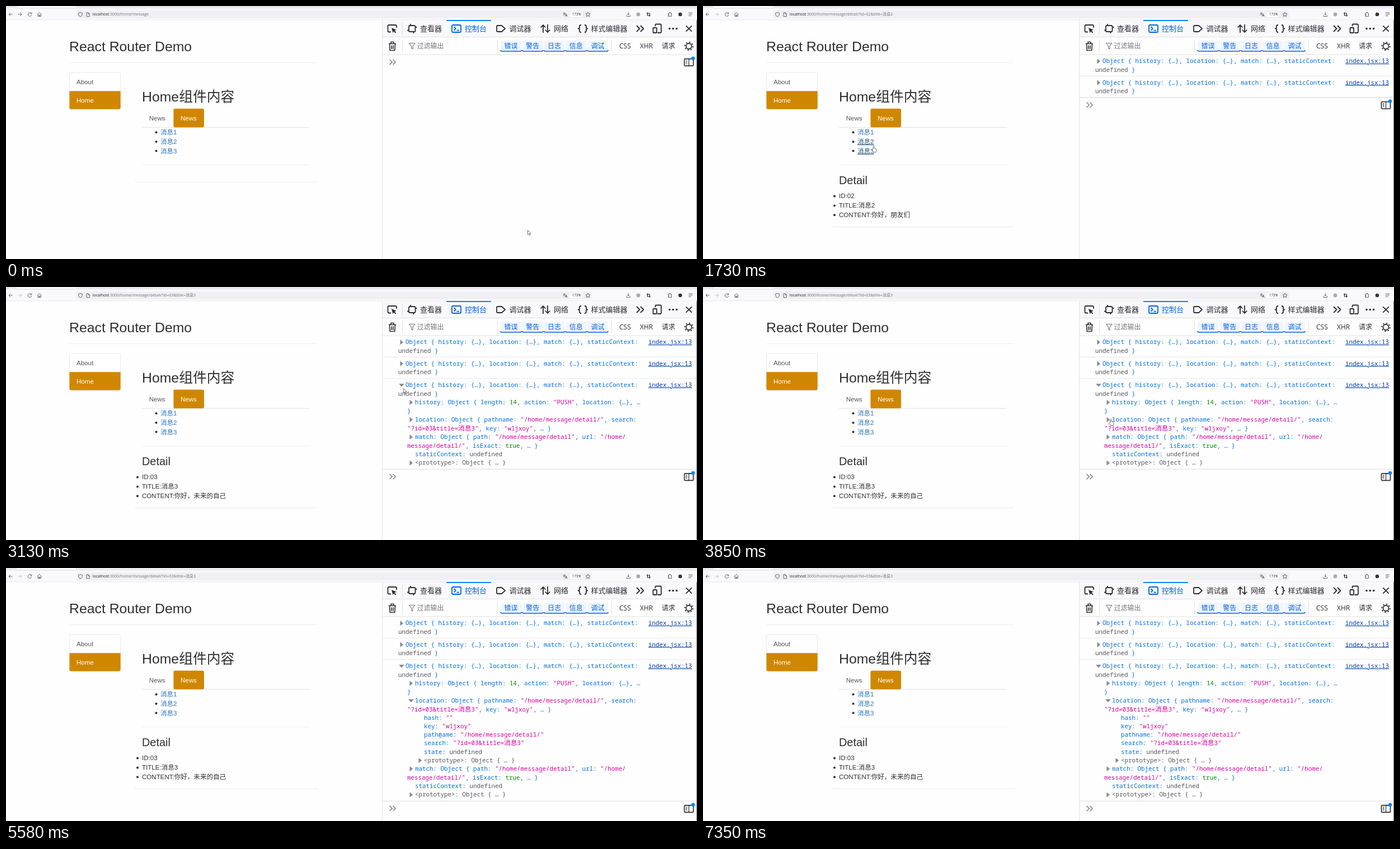
An HTML page for the animation above (7440 ms loop, 1235 px wide and 453 px high).

```html
<!DOCTYPE html>
<html lang="zh">
<head>
<meta charset="utf-8">
<title>React Router Demo</title>
<style>
html, body { margin: 0; width: 100%; height: 100%; overflow: hidden; background: #fefefe; }
svg { display: block; width: 100vw; height: 100vh; }
text { white-space: pre; }
.page { font: 11.55px "Liberation Sans", "Noto Sans CJK SC", sans-serif; fill: #2e2e2e; }
.url { font: 7.02px "Open Sans", "Noto Sans CJK SC", sans-serif; fill: #707078; }
.ui { font: 12px "Open Sans", "Noto Sans CJK SC", sans-serif; fill: #2b2b33; }
.tab { font-size: 13px; font-weight: 500; }
.mono { font: 500 10.83px "Noto Sans Mono", "Noto Sans CJK SC", monospace; fill: #006fe0; }
.mono .str { fill: #d8009f; }
.mono .num { fill: #058b00; }
.mono .dim, .mono.dim { fill: #55555e; }
.mono .cjk { font-size: 11.8px; font-weight: 400; }
.mono.sel, .mono.sel tspan { fill: #fff; }
.line { fill: none; stroke: #2b2b33; stroke-width: 1.8; stroke-linejoin: round; }
.thin { fill: none; stroke: #55555c; stroke-width: .9; }
.link { fill: #2c74b6; }
.link.on { fill: #23527c; text-decoration: underline; }
</style>
</head>
<body>
<svg viewBox="0 0 1235 453" preserveAspectRatio="none">
  <rect width="1235" height="453" fill="#fefefe"/>

  <!-- browser bar -->
  <rect width="1235" height="5" fill="#ebebef"/>
  <rect x="18" width="108" height="3.5" fill="#fff" stroke="#d4d4d8" stroke-width=".7"/>
  <rect y="4.5" width="1235" height="20" fill="#f9f9fb"/>
  <path d="M0 24.8H1235" stroke="#e4e4e8" stroke-width=".8"/>
  <rect x="126" y="8" width="921" height="14" rx="2" fill="#f0f0f4"/>
  <g class="thin">
    <path d="M11.5 15H5m3-3-3 3 3 3"/>
    <path id="fwd" d="M21.5 15H28m-3-3 3 3-3 3"/>
    <path d="M45.5 13.5A3.3 3.3 0 1 0 45.8 16M45.8 11.5v2.3h-2.3"/>
    <path d="M56 15l3.7-3.5L63.4 15M57 14.5V18.5h5.4v-4M59 18.5v-2.5h1.5v2.5"/>
    <path d="M133 11.5l3.3 1v3q-.5 2.5-3.3 3.5-2.8-1-3.3-3.5v-3z"/>
    <path d="M144 11.8h3l2.3 2.3v4.7H144zM147 11.8v2.3h2.3"/>
    <path d="M995.5 12.8h4.5M997.7 11.8v1M996 16.5l3.3-3.5M996.7 14l2.5 2.5M999.3 18.8l1.9-4.8 1.9 4.8M1000 17.2h2.5"/>
    <path d="M1040 11l1.2 2.7 2.9.3-2.2 1.9.7 2.9-2.6-1.5-2.6 1.5.7-2.9-2.2-1.9 2.9-.3z"/>
    <path d="M1112.3 11v5m-2-2 2 2 2-2M1109 16.5v2h6.6v-2"/>
    <path d="M1146.5 11.5v5.5h5.5M1144.8 13h5.5v5.8" stroke="#222" stroke-width="1.2"/>
    <path d="M1183.5 13h2v-1.5h2V13h2v5.5h-6v-2h1.5v-1.5h-1.5z"/>
    <path d="M1220 12h6.5M1220 14.7h6.5M1220 17.4h4.5"/>
  </g>
  <rect x="1008" y="10.5" width="22" height="9" rx="2" fill="#fff"/>
  <text class="url" x="1012" y="17.3" style="font-size:6.2px;fill:#222">173%</text>
  <circle cx="1130" cy="15" r="3.4" fill="#aaa"/>
  <circle cx="1205" cy="15" r="3.3" fill="#333"/>
  <circle id="badge" cx="1226" cy="12.5" r="1.3" fill="#e8b030"/>
  <text class="url" x="154.7" y="17.3"><tspan fill="#222">localhost</tspan><tspan id="path"></tspan></text>

  <!-- web page -->
  <g class="page">
    <text x="113" y="80.7" font-size="24.8">React Router Demo</text>
    <path d="M113 101.5H556M243 284.5H543" stroke="#efefef"/>
    <rect x="113.5" y="119" width="91" height="66" rx="3" fill="#fff" stroke="#e2e2e2" stroke-width=".8"/>
    <path d="M113.4 152.3H204.7V182q0 2.8-2.8 2.8H116.2q-2.8 0-2.8-2.8z" fill="#d08700"/>
    <text x="126" y="139.7" fill="#555">About</text>
    <text x="126" y="172.8" fill="#fff">Home</text>
    <path id="panel" fill="none" stroke="#ececec"/>
    <text x="243" y="170.5" font-size="24.8">Home组件内容</text>
    <path d="M243 217.3H543" stroke="#e0e0e0"/>
    <text x="255.7" y="204.5" fill="#555">News</text>
    <rect x="299.4" y="183.8" width="54.6" height="33.4" rx="2.8" fill="#d08700"/>
    <text x="312" y="204.5" fill="#fff">News</text>
    <g id="links"></g>
    <g id="detail">
      <text x="243" y="318.8" font-size="19.9">Detail</text>
      <circle cx="235" cy="340.5" r="2"/><circle cx="235" cy="357.5" r="2"/><circle cx="235" cy="374.3" r="2"/>
      <text x="243" y="344.3" id="d0"></text>
      <text x="243" y="361.2" id="d1"></text>
      <text x="243" y="378" id="d2"></text>
    </g>
  </g>

  <!-- developer tools -->
  <rect x="673" y="25.2" width="562" height="30" fill="#f9f9fb"/>
  <path d="M672.7 25V453M673 55.5H1235M673 87H1235M708.5 29V51M708.5 61V82M878.5 61V82M1082.5 61V82" stroke="#e0e0e2"/>
  <rect x="787" y="25" width="80" height="2" fill="#0a84ff"/>
  <g class="line">
    <path d="M688 46.5H684.5q-2 0-2-2V36q0-2 2-2H696q2 0 2 2V39"/>
    <path d="M689 39l9 3.8-3.7 1.3 3 3-1.3 1.3-3-3-1.3 3z" fill="#2b2b33" stroke="none"/>
    <rect x="720" y="35" width="11.5" height="11" rx="2"/>
    <path d="M723 35V32M728.5 46v3M720 43.5h-3M731.5 38h3"/>
    <g stroke="#0061e0"><rect x="797" y="34" width="16" height="13" rx="2"/><path d="M800.5 37l3.3 3.3-3.3 3.3M805.5 43.7h4.5"/></g>
    <path d="M879 35h7l6 5.5-6 5.5h-7q-2 0-2-2v-7q0-2 2-2z"/>
    <path d="M960 48V34m-4.3 4.5L960 34l4.3 4.5M968 33V47m-4.3-4.5L968 47l4.3-4.5"/>
    <path d="M1028 34q-3 0-3 2.5v2q0 2-2.3 2 2.3 0 2.3 2v2q0 2.5 3 2.5M1034 34q3 0 3 2.5v2q0 2 2.3 2-2.3 0-2.3 2v2q0 2.5-3 2.5"/>
    <path d="M1127 35l5.5 5.5-5.5 5.5M1134 35l5.5 5.5-5.5 5.5"/>
    <path d="M1160.5 36.5V34q0-1.5 1.5-1.5h7.5q1.5 0 1.5 1.5V46.5q0 1.5-1.5 1.5H1164.5"/>
    <rect x="1156.5" y="39" width="6.5" height="9" rx="1"/>
    <path d="M1215.3 35.3l10.4 10.4M1225.7 35.3l-10.4 10.4"/>
    <path d="M684 67.5h13M688 67v-2.5h5V67M685.5 68l.7 11.5h8.6l.7-11.5M689 70.5V77M692 70.5V77" stroke-width="1.6"/>
    <path d="M720.5 66.5h10.5l-4 5v5.5l-2.5-1.8V71.5z" style="stroke:#77777c;stroke-width:1.1"/>
    <circle cx="1220.5" cy="72" r="5"/>
    <circle cx="1220.5" cy="72" r="7.3" stroke-dasharray="2.4 3.334"/>
  </g>
  <g fill="#2b2b33"><circle cx="1186" cy="40.5" r="1.8"/><circle cx="1192.3" cy="40.5" r="1.8"/><circle cx="1198.6" cy="40.5" r="1.8"/></g>
  <g class="ui" id="tools"></g>
  <g id="console"></g>
  <g id="prompt">
    <path d="M685.5-4.8l4.7 4.7-4.7 4.7M691.5-4.8l4.7 4.7-4.7 4.7" class="line" style="stroke:#86868c;stroke-width:1.5"/>
    <g class="line" style="stroke-width:1.7"><rect x="1212.5" y="-5.8" width="16" height="12.5" rx="1.5"/><path d="M1220.5-6V7M1215-2.5h2.5M1215 0h2.5M1215 2.5h2.5" stroke-width="1.2"/></g>
    <circle cx="1228" cy="-6.8" r="3.2" fill="#0a84ff"/>
  </g>
  <rect x="1234" y="25" width="1" height="428" fill="#77777c"/>

  <g id="cursor" stroke="#555" stroke-width=".8" stroke-linejoin="round">
    <path id="arrow" d="M.5.5V8.5l1.9-1.7 1.3 2.9 1.3-.6-1.3-2.8h2.5z" fill="#fff"/>
    <path id="hand" d="M2.8 7V1.5q0-1 .9-1t.9 1V5l3.2.7q1.3.4 1.1 1.7l-.7 4.8H3.7L1 8.5q-.5-1.3.5-1.5z" fill="#fff"/>
    <path id="beam" d="M-2-4H2M-2 4H2M0-4V4" fill="none" stroke="#777"/>
  </g>
</svg>
<script>
const LOOP = 7440, TICK = 82.7, LEAD = 40, ROW = 38.4, TOP = 87;
const $ = id => document.getElementById(id);
const esc = s => s.replace(/&/g, '&amp;').replace(/</g, '&lt;');
const show = (id, on) => $(id).style.display = on ? '' : 'none';
const moveY = (id, y) => $(id).setAttribute('transform', `translate(0 ${y})`);

// toolbar labels
const ink = '#2b2b33', blue = '#0061e0';
const label = (x, y, s, fill = ink, cls = '') => `<text class="${cls}" x="${x}" y="${y}" style="fill:${fill}">${s}</text>`;
$('tools').innerHTML =
  [[740, '查看器'], [820, '控制台', blue], [899.5, '调试器'], [979, '网络'], [1045.5, '样式编辑器']]
    .map(([x, s, c]) => label(x, 45.3, s, c, 'tab')).join('') +
  label(734.5, 76, '过滤输出', '#77777c') +
  ['错误', '警告', '日志', '信息', '调试'].map((s, i) => {
    const x = 884 + i * 38.75;
    return `<path d="M${x} 81V64q0-2 2-2h33q2 0 2 2v17z" fill="#f0f5fd"/>
      <path d="M${x} 79q0 2 2 2h33q2 0 2-2" fill="none" stroke="${blue}" stroke-width="1.6"/>` + label(x + 6.5, 76, s, blue);
  }).join('') +
  [[1096, 'CSS'], [1133, 'XHR'], [1172, '请求']].map(([x, s]) => label(x, 76, s)).join('');

$('links').innerHTML = [1, 2, 3].map(n => {
  const y = 209.5 + 16.7 * n;
  return `<circle cx="268.5" cy="${y}" r="2"/><text class="link" id="a${n}" x="276" y="${y + 4}">消息${n}</text>`;
}).join('');

// console text
const TOKEN = /("[^"]*"?|^\w\S*")|\b(\d+|true)\b|(undefined)|([^"\dtu]+|.)/g;
const paint = s => s.replace(TOKEN, (m, str, num, dim) => {
  const cls = str ? 'str' : num ? 'num' : dim ? 'dim' : '';
  const body = esc(m).replace(/[\u4e00-\u9fff]+/g, '<tspan class="cjk">$&</tspan>');
  return cls ? `<tspan class="${cls}">${body}</tspan>` : body;
});
const mono = (x, y, s, id = '') =>
  `<text class="mono" id="${id}" x="${x}" y="${y + 3.8}">${paint(s)}</text>`;
const twisty = (x, y, id = '') =>
  `<path id="${id}" transform="translate(${x} ${y + .6})" d="M-2.5-4.7L3 0L-2.5 4.7z" fill="#87878c"/>`;
const proto = (x, y) =>
  `<text class="mono dim" x="${x}" y="${y + 3.8}">&lt;prototype&gt;: Object { … }</text>` + twisty(x - 7, y);
const turn = (id, on) => {
  const at = $(id).getAttribute('transform').split(' rotate')[0];
  $(id).setAttribute('transform', at + (on ? ' rotate(90)' : ''));
};
const query = '"?id=03&title=消息3"';

const logs = [0, 1, 2].map(i => {
  const y = 98.3 + ROW * i;
  return `<g id="log${i}">` + twisty(707, y, 'tw' + i) +
    mono(714, y, 'Object { history: {…}, location: {…}, match: {…}, staticContext:') +
    mono(701, y + 15.7, 'undefined }') +
    `<text class="mono" x="1148" y="${y + 3.8}" style="fill:#003eaa;text-decoration:underline">index.jsx:13</text>` +
    (i < 2 ? `<path d="M673 ${TOP + ROW * (i + 1)}H1234" stroke="#e8e8ea"/>` : '') + '</g>';
}).join('');

$('console').innerHTML = logs + '<g id="tree">' +
  twisty(724, 206) + mono(731, 206, 'history: Object { length: 14, action: "PUSH", location: {…}, …') + mono(717, 222, '}') +
  twisty(724, 237, 'twLoc') + mono(731, 237, 'location: Object { pathname: "/home/message/detail/", search:') +
  mono(717, 253, query + ', key: "w1jxoy", … }') +
  '<g id="loc"><rect id="mark" x="701" y="305.5" width="440" height="15" fill="#0074e8"/>' +
  ['hash: ""', 'key: "w1jxoy"', 'pathname: "/home/message/detail/"', 'search: ' + query, 'state: undefined']
    .map((s, i) => mono(747, 268 + 15.2 * i, s, 'kid' + i)).join('') + proto(747, 344) + '</g>' +
  '<g id="tail">' + twisty(724, 268) + mono(731, 268, 'match: Object { path: "/home/message/detail", url: "/home/') +
  mono(717, 284, 'message/detail/", isExact: true, … }') + mono(731, 299, 'staticContext: undefined') + proto(731, 314.5) +
  '</g></g><path id="floor" d="M673 0H1234" stroke="#dcdce0"/>';

// pointer stops: tick, x, y, shape until the next stop
const stops = [
  [0, 932, 401, 'arrow'], [8, 294, 228, 'hand'], [12, 294, 228, 'hand'], [15, 296, 243, 'hand'],
  [19, 296, 243, 'hand'], [22, 303, 252, 'hand'], [26, 304, 252, 'arrow'], [30, 748, 194, 'arrow'],
  [32, 716, 178, 'arrow'], [33, 709, 178, 'arrow'], [37, 709, 178, 'arrow'], [44, 727, 236, 'hand'],
  [47, 725, 236, 'hand'], [51, 722, 239, 'hand'], [57, 722, 239, 'beam'], [65, 775, 300, 'beam'],
  [67, 776, 300, 'beam'], [72, 786, 312, 'beam'], [77, 786, 312, 'beam'], [84, 1165, 442, '']
];
function pointer(k) {
  let i = stops.length - 1;
  while (stops[i][0] > k) i--;
  const a = stops[i], b = stops[i + 1] || a;
  const p = b === a ? 0 : (k - a[0]) / (b[0] - a[0]), e = p * p * (3 - 2 * p);
  $('cursor').setAttribute('transform', `translate(${a[1] + (b[1] - a[1]) * e} ${a[2] + (b[2] - a[2]) * e})`);
  for (const s of ['arrow', 'hand', 'beam']) show(s, s === a[3]);
}

const CONTENT = ['', '你好，中国', '你好，朋友们', '你好，未来的自己'];
const count = (k, ...at) => at.filter(t => k >= t).length;
const lit = [[8, 18], [14, 23], [21, 35]];

function draw(k) {
  const id = count(k, 10, 18, 23), rows = count(k, 13, 20, 25);
  const tree = k >= 37, loc = k >= 56, sel = k >= 74 && k < 89, whole = k >= 75;

  $('path').textContent = ':3000/home/message' + (id ? `/detail/?id=0${id}&title=消息${id}` : '');
  $('fwd').setAttribute('stroke', id ? '#bbb' : '#55555c');
  show('badge', k >= 10 && k < 89);
  show('detail', id);
  $('d0').textContent = 'ID:0' + id;
  $('d1').textContent = 'TITLE:消息' + id;
  $('d2').textContent = 'CONTENT:' + CONTENT[id];
  $('panel').setAttribute('d', `M230.5 ${id ? 392.5 : 312}q0 3 3 3H553q3 0 3-3`);
  lit.forEach(([from, to], i) => $('a' + (i + 1)).classList.toggle('on', k >= from && k < to));

  for (let i = 0; i < 3; i++) show('log' + i, rows > i);
  turn('tw2', k >= 35);
  turn('twLoc', k >= 54);
  show('tree', tree);
  show('loc', loc);
  moveY('tail', loc ? 91 : 0);
  const floor = TOP + ROW * rows + (tree ? 124 : 0) + (loc ? 91 : 0);
  moveY('floor', floor);
  show('floor', rows);
  moveY('prompt', floor + 13.5);

  show('mark', sel);
  $('mark').setAttribute('x', whole ? 701 : 747);
  $('mark').setAttribute('width', whole ? 440 : 39);
  $('kid3').classList.toggle('sel', sel && whole);
  pointer(k);
}

let last = -1;
function frame(now) {
  const k = Math.min(89, Math.floor((now % LOOP + LEAD) / TICK));
  if (k !== last) draw(last = k);
  requestAnimationFrame(frame);
}
draw(0);
requestAnimationFrame(frame);
</script>
</body>
</html>
```
